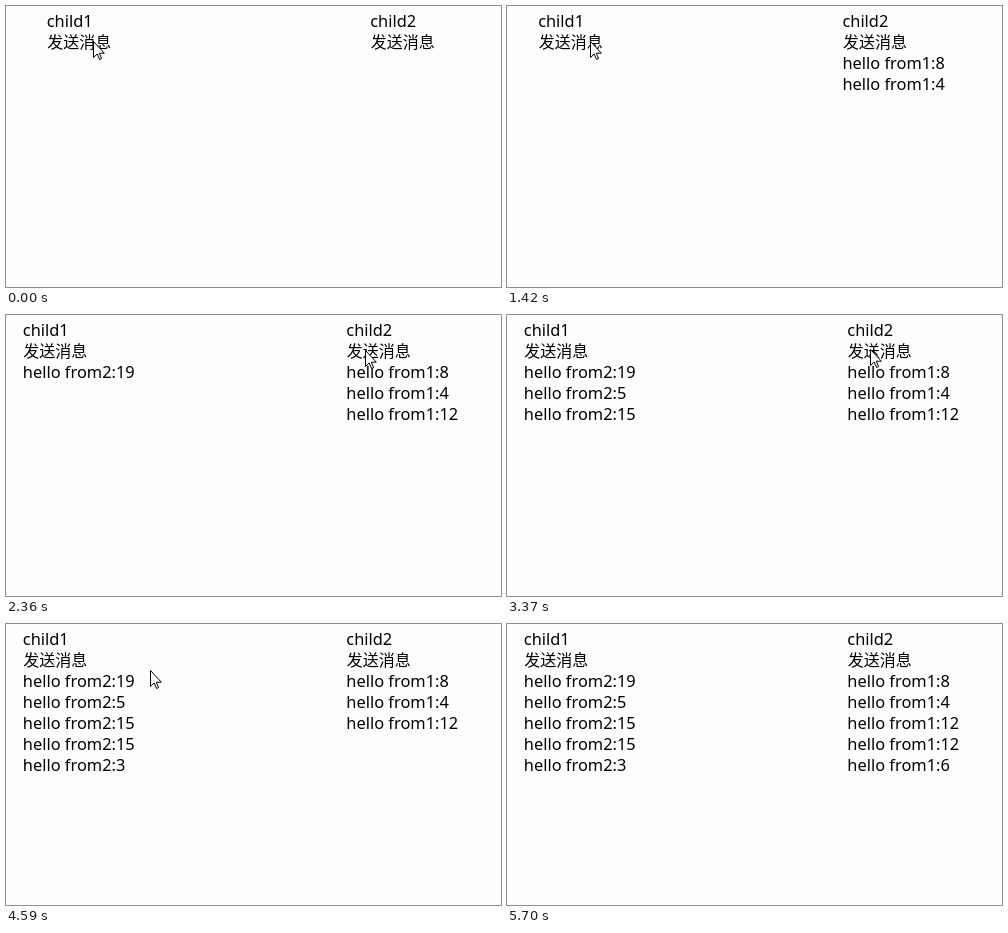
An HTML page for the animation above (6.29 s loop, 495 by 281 pixels).

```html
<!DOCTYPE html>
<html lang="zh-CN">
<head>
<meta charset="utf-8">
<style>
  html, body { margin: 0; width: 100%; height: 100%; overflow: hidden; background: #fefefe; }
  #stage { position: relative; width: 100%; height: 100%; overflow: clip; contain: strict; }
  #row {
    position: absolute; left: -89px; top: 4px; width: 647px;
    display: flex; justify-content: space-around;
    font: 16.4px/21px "Noto Sans", sans-serif; color: #000; white-space: nowrap;
  }
  #row div { height: 21px; }
  #row .send {
    position: relative; left: .5px;
    font: 300 16px/21px "Noto Sans CJK SC", "Noto Sans CJK", sans-serif;
  }
  #cursor { position: absolute; left: 0; top: 0; }
</style>
</head>
<body>
<div id="stage">
  <div id="row">
    <section><div>child1</div><div class="send">发送消息</div></section>
    <section><div>child2</div><div class="send">发送消息</div></section>
  </div>
  <svg id="cursor" width="13" height="20">
    <path d="M.5 .5V16.5L4.2 13L6.6 18.5L8.6 17.6L6.3 12.2H11.3Z" fill="#fff" stroke="#000"/>
  </svg>
</div>
<script>
const LOOP = 6290, CLICK_GAP = 430, STEP = 125, EXIT = 5700;
const columns = document.querySelectorAll('section');
const cursor = document.getElementById('cursor');

// Each burst clicks at a steady pace; its messages land in the other column
const bursts = [
  { start: 710, sender: 1, values: [8, 4, 12] },
  { start: 2360, sender: 2, values: [19, 5, 15, 15, 3] },
  { start: 5140, sender: 1, values: [12, 6] },
];
const messages = bursts.flatMap(({ start, sender, values }) => values.map((value, i) => {
  const line = document.createElement('div');
  line.textContent = `hello from${sender}:${value}`;
  columns[2 - sender].append(line);
  return { time: start + i * CLICK_GAP, line };
}));

// The pointer moves in coarse steps, slowing down towards each stop
const home = { x: 87, y: 35 };
const moves = [
  { start: 1420, steps: 1, x: 83, y: 35, sag: 0 },
  { start: 1690, steps: 4, x: 359, y: 35, sag: 0 },
  { start: 2940, steps: 2, x: 363, y: 34, sag: 0 },
  { start: 4350, steps: 5, x: 60, y: 38, sag: 10 },
];
const easeOut = u => 1 - (1 - u) ** 2.5;

function pointerAt(t) {
  return moves.filter(m => t >= m.start).reduce((from, to) => {
    const u = Math.min(1, (Math.floor((t - to.start) / STEP) + 1) / to.steps);
    const p = easeOut(u);
    return {
      x: from.x + (to.x - from.x) * p,
      y: from.y + (to.y - from.y) * p + to.sag * Math.sin(Math.PI * u),
    };
  }, home);
}

function draw() {
  const t = performance.now() % LOOP;
  for (const { time, line } of messages) line.hidden = t < time;
  const { x, y } = pointerAt(t);
  cursor.style.transform = `translate(${Math.round(x)}px, ${Math.round(y)}px)`;
  cursor.style.visibility = t < EXIT ? 'visible' : 'hidden';
  requestAnimationFrame(draw);
}
draw();
</script>
</body>
</html>
```
